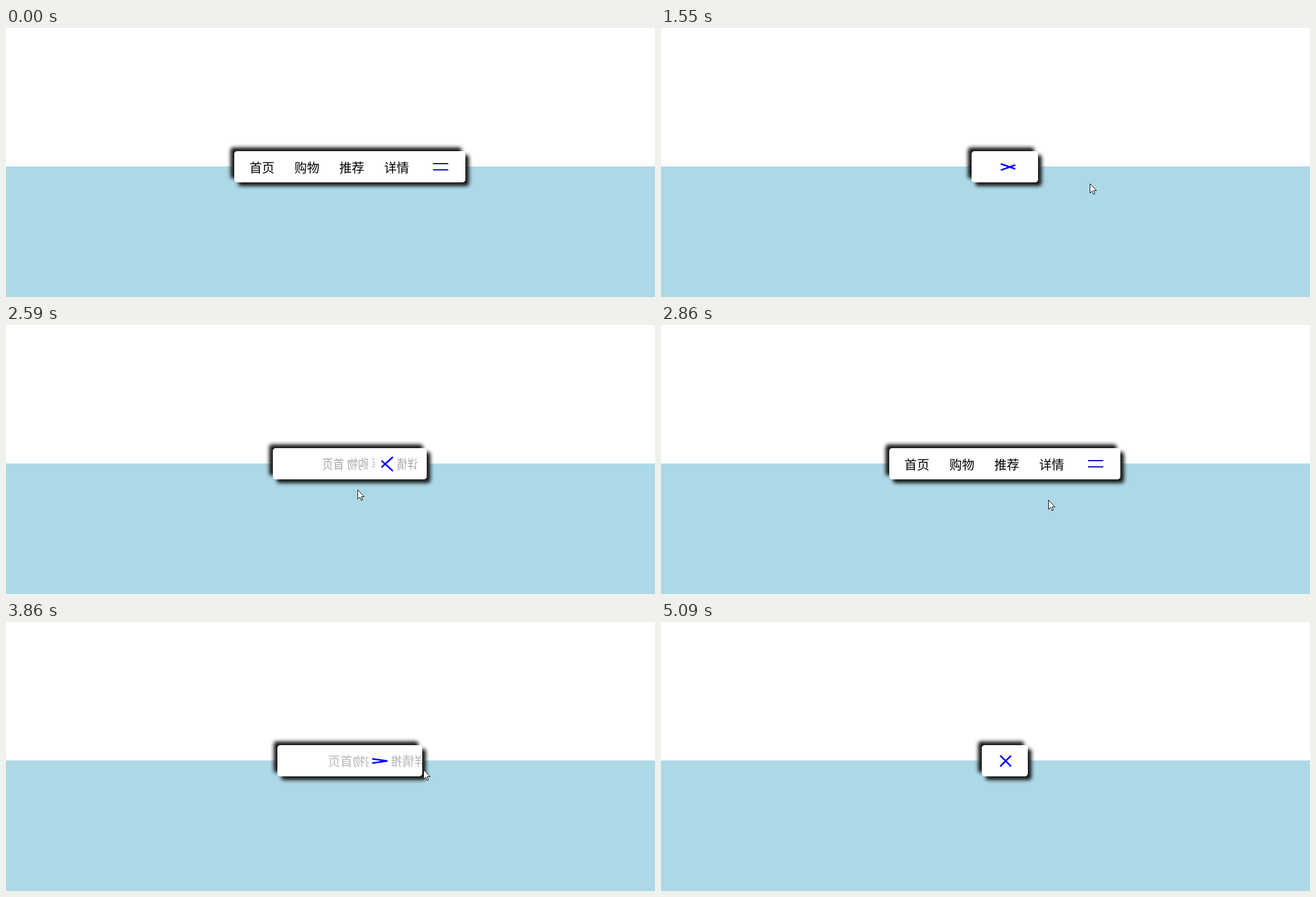
Write an HTML page that moves like this. It is 1143x474 px and loops after 5630 ms.

```html
<!DOCTYPE html>
<html lang="zh">
<head>
<meta charset="utf-8">
<title>Menu</title>
<style>
html, body { margin: 0; width: 100%; height: 100%; overflow: hidden; background: #fff; }
svg { display: block; width: 100%; height: 100%; }
text { font: 300 22px "Noto Sans CJK SC", "Noto Sans CJK", sans-serif; }
</style>
</head>
<body>
<svg viewBox="0 0 1143 474">
  <defs>
    <filter id="blur" x="-20%" y="-30%" width="140%" height="160%"><feGaussianBlur stdDeviation="3.2"/></filter>
    <clipPath id="clip"><rect class="box" y="217" height="55" rx="5"/></clipPath>
  </defs>
  <rect y="244" width="1143" height="230" fill="#add8e6"/>
  <g fill="#141414">
    <g filter="url(#blur)"><rect class="box" y="210.5" height="55" rx="5" transform="translate(-6.5)"/></g>
    <g filter="url(#blur)"><rect class="box" y="223.5" height="55" rx="5" transform="translate(6.5)"/></g>
  </g>
  <rect class="box" y="217" height="55" rx="5" fill="#fff"/>
  <g clip-path="url(#clip)">
    <g id="items"><text>首页</text><text>购物</text><text>推荐</text><text>详情</text></g>
    <rect id="button" y="224.5" height="40.7" fill="#fff"/>
    <rect class="line"/><rect class="line"/>
  </g>
  <path id="cursor" d="M.5 .5V17l3.8-3.6 2.5 5.6 2.4-1.1-2.4-5.4h5.1z" fill="#fff" stroke="#000"/>
  <circle id="press" r="17" fill="#ff0" opacity=".5"/>
</svg>
<script>
const LOOP = 5630, CENTER = 605.5, UNIT = 1.357;
const FIRST_CLOSE = 1020, OPEN = 2240, LAST_CLOSE = 3582;
const ENTER = 160, LEAVE = 5090;

const $ = s => document.querySelector(s), $$ = s => [...document.querySelectorAll(s)];
const boxes = $$('.box'), items = $$('#items text'), lines = $$('.line');
const button = $('#button'), cursor = $('#cursor'), press = $('#press');

const clamp = v => Math.max(0, Math.min(1, v));
const mix = (a, b, u) => a + (b - a) * u;
const set = (el, attrs) => { for (const k in attrs) el.setAttribute(k, attrs[k]); };
const show = (el, on) => set(el, { visibility: on ? 'visible' : 'hidden' });

// Pointer stops; it waits on the button before each click and moves evenly between stops.
const stops = [
  { t: ENTER, x: 1042, y: 462 },
  { t: 700, x: 766, y: 252 },
  { t: FIRST_CLOSE + 250, x: 766, y: 252 },
  { t: 1550, x: 755, y: 274 },
  { t: OPEN - 100, x: 611, y: 247 },
  { t: OPEN + 100, x: 611, y: 247 },
  { t: 2590, x: 619, y: 290 },
  { t: 2740, x: 660, y: 325 },
  { t: LAST_CLOSE - 250, x: 770, y: 243 },
  { t: LAST_CLOSE, x: 770, y: 243 },
  { t: 4190, x: 694, y: 280 },
  { t: 4560, x: 648, y: 312 },
  { t: 4780, x: 681, y: 325 },
  { t: LEAVE - 30, x: 1010, y: 451 }
];

function pointerAt(t) {
  const i = Math.max(1, stops.findIndex(s => s.t >= t));
  const a = stops[i - 1], b = stops[i];
  const u = clamp((t - a.t) / (b.t - a.t));
  return { x: Math.round(mix(a.x, b.x, u)), y: Math.round(mix(a.y, b.y, u)) };
}

// 1 is the wide menu, 0 the small one
function openness(t, closeTime) {
  if (t < OPEN) return 1 - clamp((t - FIRST_CLOSE) / closeTime);
  if (t < LAST_CLOSE) return clamp((t - OPEN) / 600);
  return 1 - clamp((t - LAST_CLOSE) / closeTime);
}

function drawMenu(t) {
  const p = openness(t, 596), spin = 1 - openness(t, 580);
  const width = mix(60, 300, p), inner = width - 40;
  const left = CENTER - width * UNIT / 2, right = CENTER + width * UNIT / 2;
  const at = v => left + v * UNIT;
  const x = Math.round(left);
  boxes.forEach(b => set(b, { x, width: Math.round(right) - x }));

  // flex row: list and button shrink in proportion when too wide
  const fit = Math.min(1, inner / (p * inner + 30));
  const list = p * inner * fit, btn = 30 * fit;
  const start = 20 + (inner - list - btn) / 2;
  set(button, { x: at(start + list), width: btn * UNIT });

  const pitch = Math.max(32, list / 4), pivot = 29.1;
  items.forEach((item, i) => set(item, {
    x: -pivot * UNIT - 0.3, y: 253.5, opacity: p * p,
    transform: `translate(${at(start + pitch * i + pivot)} 0) scale(${Math.cos(2 * Math.PI * p)} 1)`
  }));

  const resting = t < FIRST_CLOSE || (p === 1 && t < LAST_CLOSE);
  const thick = resting ? 2 : 2.8, cy = resting ? 244.5 : 244.9;
  const mid = at(start + list + 15), cx = resting ? Math.floor(mid) + 0.5 : mid;
  lines.forEach((line, i) => {
    const side = i ? -1 : 1;
    set(line, {
      x: -13.5, y: -thick / 2, width: 27, height: thick,
      fill: resting ? '#0000a8' : '#00f',
      transform: `translate(${cx} ${cy - 5.5 * side}) rotate(${765 * spin * side}) translate(0 ${7.6 * spin * side})`
    });
  });
}

function drawPointer(t) {
  const { x, y } = pointerAt(t);
  set(cursor, { transform: `translate(${x} ${y})` });
  set(press, { cx: x + 2, cy: y + 1 });
  show(cursor, t >= ENTER && t < LEAVE);
  show(press, [FIRST_CLOSE, OPEN, LAST_CLOSE].some(click => t >= click - 82 && t < click));
}

const begin = performance.now();
function tick() {
  const t = (performance.now() - begin) % LOOP;
  drawMenu(t);
  drawPointer(t);
  requestAnimationFrame(tick);
}
tick();
</script>
</body>
</html>
```
